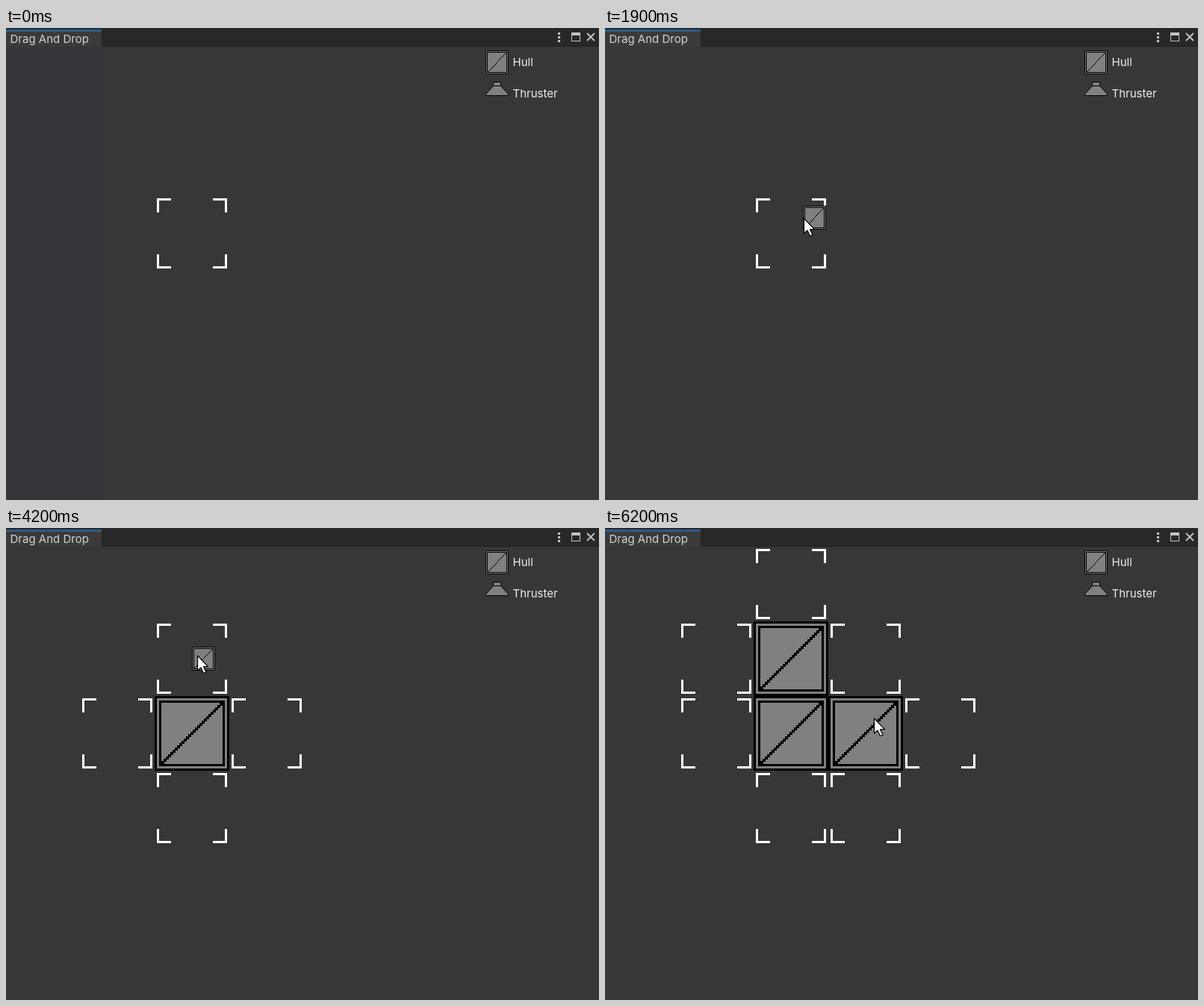
An HTML page with a canvas for the animation above (7.2 s loop, 794 by 632 pixels).

```html
<!DOCTYPE html>
<html lang="en">
<head>
<meta charset="utf-8">
<title>Drag And Drop</title>
<style>
  html, body { margin: 0; width: 100%; height: 100%; overflow: hidden; background: #373737; }
  canvas { display: block; }
</style>
</head>
<body>
<canvas id="stage" width="794" height="632"></canvas>
<script>
const ctx = document.getElementById('stage').getContext('2d');
const W = 794, H = 632, LOOP = 7200, STEP = 100;
const BG = '#373737', GRAY = '#808080', BLACK = '#000', ICON = '#c4c4c4';
const FONT = '15px Inter, "Open Sans", sans-serif';
const CELL = 100, GRID = { x: 199, y: 225 };
const HULL = { x: 642, y: 30 };

// Pointer strokes, each from where the last one ended; a small skew starts fast, bend bows the path
const entry = { t: 100, x: 764, y: 527 };
const moves = [
  { from: 100, to: 1000, x: 643, y: 46, skew: 0.028, bend: -80 },
  { from: 1100, to: 1900, x: 266, y: 254, skew: 0.2, bend: -24 },
  { from: 2000, to: 2300, x: 270, y: 262 },
  { from: 2300, to: 3000, x: 649, y: 41, skew: 0.07 },
  { from: 3150, to: 3800, x: 256, y: 170, skew: 0.4, bend: -40 },
  { from: 3900, to: 4000, x: 264, y: 164 },
  { from: 4000, to: 4200, x: 256, y: 170 },
  { from: 4400, to: 5100, x: 657, y: 45, skew: 0.15 },
  { from: 5150, to: 5600, x: 398, y: 201, skew: 0.8 },
  { from: 5600, to: 5800, x: 360, y: 254 }
];

// Each drag lifts the hull icon where the pointer grabs it and fills a cell on release
const drags = [
  { grab: 1100, drop: 2000, cell: [0, 0] },
  { grab: 3100, drop: 4400, cell: [0, -1] },
  { grab: 5100, drop: 6100, cell: [1, 0] }
];

function ease(p, skew) {
  const rise = p ** 2.5;
  return rise / (rise + skew * (1 - p) ** 2.5);
}

function pointerAt(t) {
  let { x, y } = entry;
  for (const { from, to, x: nx, y: ny, skew = 1, bend = 0 } of moves) {
    if (t < from) break;
    const f = ease(Math.min(1, (t - from) / (to - from)), skew);
    x += (nx - x) * f;
    y += (ny - y) * f + 4 * bend * f * (1 - f);
  }
  return { x: Math.round(x), y: Math.round(y) };
}

function box(x, y, w, h, color) {
  ctx.fillStyle = color;
  ctx.fillRect(x, y, w, h);
}

function shape(points, fill, width) {
  ctx.beginPath();
  points.forEach(([x, y]) => ctx.lineTo(x, y));
  ctx.closePath();
  ctx.fillStyle = fill;
  ctx.fill();
  ctx.strokeStyle = BLACK;
  ctx.lineWidth = width;
  ctx.stroke();
}

function label(text, x, y, color) {
  ctx.font = FONT;
  ctx.fillStyle = color;
  ctx.fillText(text, x, y);
}

function hull(x, y, w, h, unit) {
  [BLACK, GRAY, BLACK, GRAY].forEach((color, i) => {
    const inset = i * unit;
    box(x + inset, y + inset, w - 2 * inset, h - 2 * inset, color);
  });
  // Stepped diagonal from the lower left to the upper right inner corner
  const edge = 3 * unit;
  const dot = unit > 1 ? unit + 1 : 1;
  const dx = w - 2 * edge - dot, dy = h - 2 * edge - dot;
  const steps = Math.round(dx / unit);
  for (let i = 0; i <= steps; i++) {
    const f = i / steps;
    box(x + edge + Math.round(dx * f), y + edge + Math.round(dy * (1 - f)), dot, dot, BLACK);
  }
}

const hullIcon = (x, y) => hull(x, y, 31, 32, 1);

function thrusterIcon() {
  shape([[652.5, 77.5], [662.5, 77.5], [672.5, 88.5], [672.5, 90.5],
         [642.5, 90.5], [642.5, 88.5]], GRAY, 1);
  shape([[652.5, 72.5], [662.5, 72.5], [662.5, 77.5], [652.5, 77.5]], GRAY, 1);
}

function slot(col, row) {
  const x = GRID.x + 3 + col * CELL, y = GRID.y + 3 + row * CELL;
  const size = 94, arm = 19, t = 3;
  for (const right of [0, 1]) {
    for (const low of [0, 1]) {
      box(x + right * (size - arm), y + low * (size - t), arm, t, '#fff');
      box(x + right * (size - t), y + low * (size - arm), t, arm, '#fff');
    }
  }
}

function openSlots(cells) {
  if (!cells.length) return [[0, 0]];
  const taken = new Set(cells.map(String));
  const around = cells.flatMap(([c, r]) => [[c, r - 1], [c - 1, r], [c + 1, r], [c, r + 1]]);
  return around.filter(cell => !taken.has(String(cell)));
}

function pointer({ x, y }) {
  const outline = [[0, 0], [0, 20], [4.5, 16], [8, 23.5], [11.5, 22], [8, 14.7], [14, 14.7]];
  ctx.lineJoin = 'round';
  shape(outline.map(([px, py]) => [x + px + 0.5, y + py + 1]), '#fff', 1.2);
  ctx.lineJoin = 'miter';
}

function chrome(t) {
  box(0, 0, W, H, BG);
  if (t < entry.t) box(0, 25, 128, H - 25, '#35363a');
  box(0, 0, W, 24, '#282828');
  box(128, 24, W - 128, 1, '#202020');
  box(0, 2, 128, 23, '#3a3a3a');
  box(0, 2, 128, 3, '#2c5d87');
  label('Drag And Drop', 5.5, 20, '#d2d2d2');

  for (let i = 0; i < 3; i++) box(739, 6 + 5 * i, 3, 3, ICON);
  ctx.strokeStyle = ICON;
  ctx.lineWidth = 1;
  ctx.strokeRect(757.5, 6.5, 11, 11);
  box(757, 6, 12, 4, ICON);
  ctx.lineWidth = 1.8;
  ctx.beginPath();
  ctx.moveTo(778, 7);
  ctx.lineTo(788, 17);
  ctx.moveTo(788, 7);
  ctx.lineTo(778, 17);
  ctx.stroke();
}

function palette() {
  hullIcon(HULL.x, HULL.y);
  thrusterIcon();
  label('Hull', 678.5, 51, '#eee');
  label('Thruster', 678.5, 93, '#eee');
}

function draw(t) {
  chrome(t);
  palette();
  const cells = drags.filter(d => t >= d.drop).map(d => d.cell);
  openSlots(cells).forEach(([c, r]) => slot(c, r));
  cells.forEach(([c, r]) => hull(GRID.x + c * CELL, GRID.y + r * CELL, CELL, CELL, 3));

  if (t < entry.t) return;
  const tip = pointerAt(t);
  const drag = drags.find(d => t >= d.grab && t < d.drop);
  if (drag) {
    const start = pointerAt(drag.grab);
    hullIcon(HULL.x + tip.x - start.x, HULL.y + tip.y - start.y);
  }
  pointer(tip);
}

const begin = performance.now();
function frame() {
  const t = (performance.now() - begin) % LOOP;
  draw(Math.floor(t / STEP) * STEP);
  requestAnimationFrame(frame);
}
frame();
</script>
</body>
</html>
```
